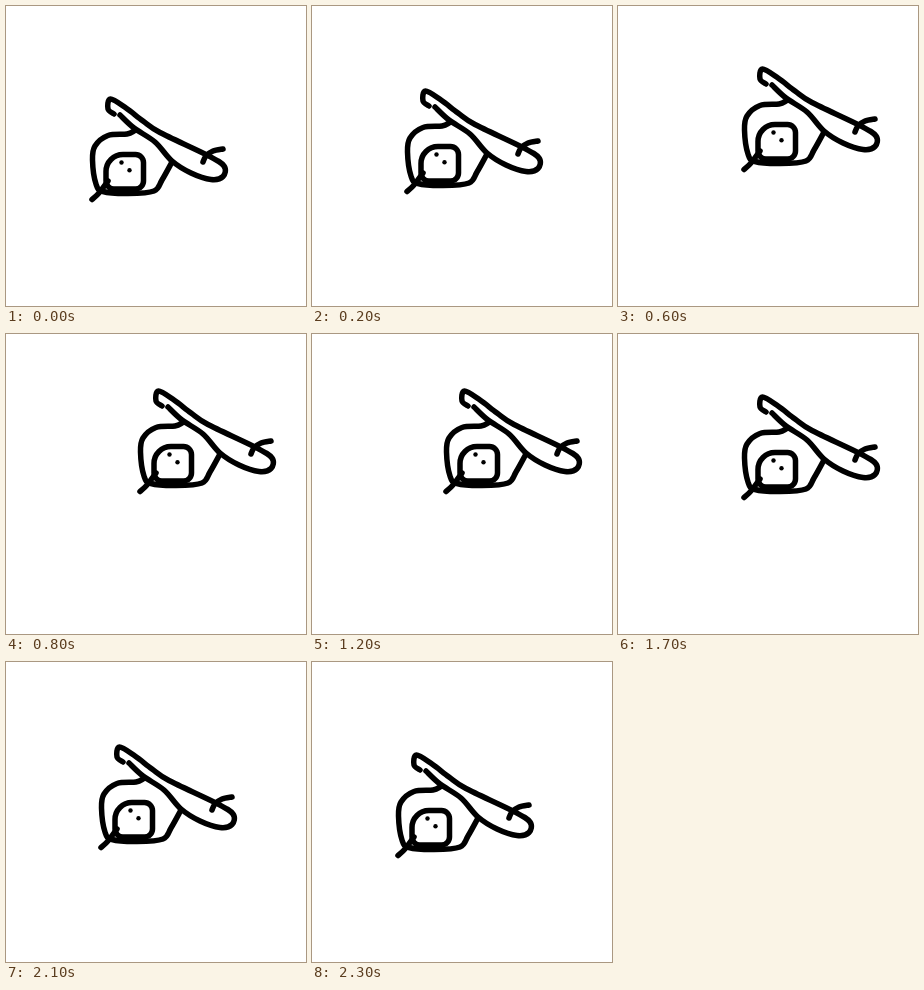
Recreate the animation shown at these times as an HTML page with a canvas. Size 300 by 300 pixels, loop 2.5 s.

```html
<!DOCTYPE html>
<html lang="en">
<head>
<meta charset="utf-8">
<title>Doodle</title>
<style>
  html, body { margin: 0; width: 100%; height: 100%; overflow: hidden; background: #fff; }
  canvas { display: block; width: 100vw; height: 100vh; }
</style>
</head>
<body>
<canvas id="stage" width="300" height="300"></canvas>
<script>
const ctx = document.getElementById('stage').getContext('2d');
const LOOP = 2500, STEP = 200, TURN = 1200, HOLD = 500;

// Stops on the way up; the way back retraces them.
const stops = [[0, 0], [9, -8], [26, -18], [40, -30], [48, -36], [59, -44]];

function stopAt(t) {
  if (t < TURN) return stops[Math.floor(t / STEP)];
  const back = Math.floor((t - TURN - HOLD) / STEP);
  return stops[3 - Math.max(-1, back)];
}

// Smooth stroke passing through every key point.
function curve(...pts) {
  const at = i => pts[Math.max(0, Math.min(pts.length - 1, i))];
  ctx.beginPath();
  ctx.moveTo(...pts[0]);
  for (let i = 0; i < pts.length - 1; i++) {
    const [a, b, c, d] = [at(i - 1), at(i), at(i + 1), at(i + 2)];
    ctx.bezierCurveTo(
      b[0] + (c[0] - a[0]) / 6, b[1] + (c[1] - a[1]) / 6,
      c[0] - (d[0] - b[0]) / 6, c[1] - (d[1] - b[1]) / 6,
      c[0], c[1]
    );
  }
  ctx.stroke();
}

function dot(x, y) {
  ctx.beginPath();
  ctx.arc(x, y, 2.2, 0, Math.PI * 2);
  ctx.fill();
}

function drawBody() {
  curve([128, 125], [121, 128], [102, 129.5], [89, 140], [86.5, 154],
    [90, 178], [97, 185.5], [122, 187.5], [148, 185], [156, 174], [166, 156]);
}

function drawFace() {
  ctx.beginPath();
  ctx.roundRect(100, 148.5, 37.5, 34.5, [17, 8, 8, 8]);
  ctx.stroke();
  dot(115.5, 156.5);
  dot(123.5, 164.3);
}

function drawPole() {
  curve([114, 109], [128, 122], [149, 136], [166, 155], [185, 167],
    [205, 173.5], [217, 170.5], [218, 160], [201, 149], [154, 126.5],
    [137, 115], [120, 102], [104.5, 93], [102, 103], [108, 108]);
}

function draw(t) {
  ctx.setTransform(1, 0, 0, 1, 0, 0);
  ctx.fillStyle = '#fff';
  ctx.fillRect(0, 0, 300, 300);
  ctx.translate(...stopAt(t));
  ctx.fillStyle = ctx.strokeStyle = '#000';
  ctx.lineWidth = 5.5;
  ctx.lineCap = ctx.lineJoin = 'round';
  drawBody();
  drawFace();
  drawPole();
  curve([197, 156], [200, 150], [207, 145], [217, 143]); // hook
  curve([86, 193.5], [93, 187], [102, 175]); // tail
}

const begin = performance.now();
function tick() {
  draw((performance.now() - begin) % LOOP);
  requestAnimationFrame(tick);
}
tick();
</script>
</body>
</html>
```
